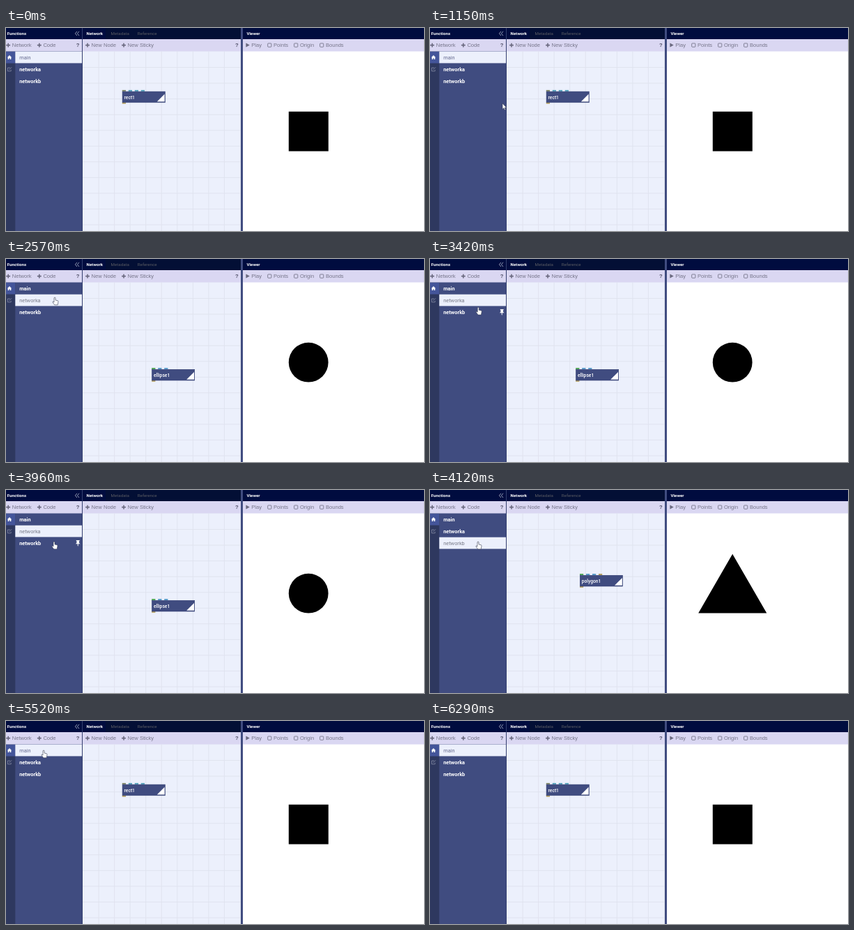
An HTML page for the animation above (7700 ms loop, 600x291 px).

```html
<!DOCTYPE html>
<html lang="en">
<head>
<meta charset="utf-8">
<title>Switching networks</title>
<style>
  html, body { margin: 0; width: 100%; height: 100%; overflow: hidden; background: #fff; }
  svg { display: block; width: 600px; height: 291px; }
  text { font-family: Roboto, "Open Sans", sans-serif; font-weight: 600; fill: #fff; }
  .head { font-size: 6.2px; }
  .tab { font-size: 6.2px; font-weight: 400; fill: #5b5c63; }
  .tool { font: 7.6px "Liberation Sans", Arial, sans-serif; fill: #77768b; }
  .help { font-weight: 700; fill: #55546c; }
  .row { font-size: 7.4px; }
  .node { font-size: 6.7px; font-weight: 500; }
</style>
</head>
<body>
<svg id="stage" viewBox="0 0 600 291" xmlns="http://www.w3.org/2000/svg"></svg>
<script>
const LOOP = 7700;
const ROW_TOP = 33.7, ROW_HEIGHT = 17;
const SLATE = '#404c80', PAPER = '#ecf0fc';
const GREEN = '#4da653', BLUE = '#579bc9', OLIVE = '#b29b58', TEAL = '#55a3bd', MOSS = '#7f8668';
const stage = document.getElementById('stage');

function add(tag, attrs, parent = stage, content = '') {
  const el = document.createElementNS('http://www.w3.org/2000/svg', tag);
  for (const key in attrs) el.setAttribute(key, attrs[key]);
  el.textContent = content;
  parent.appendChild(el);
  return el;
}
const box = (x, y, width, height, fill, parent) => add('rect', { x, y, width, height, fill }, parent);
const path = (d, attrs, parent) => add('path', { d, ...attrs }, parent);
const label = (x, y, cls, content, parent) => add('text', { x, y, class: cls }, parent, content);
const place = (el, x, y) => el.setAttribute('transform', `translate(${x} ${y})`);
const show = (el, on) => el.setAttribute('visibility', on ? 'visible' : 'hidden');

function plusButton(x, content) {
  path(`M${x - 2.9} 24.6h5.8M${x} 21.7v5.8`, { stroke: '#6b6a80', 'stroke-width': 1.6 });
  label(x + 5.6, 27.3, 'tool', content);
}
function checkbox(x, content) {
  add('rect', { x, y: 22, width: 5.2, height: 5.2, rx: 0.8, fill: 'none', stroke: '#77768b', 'stroke-width': 0.9 });
  label(x + 8.3, 27.3, 'tool', content);
}

// Panels
box(0, 0, 600, 291, '#fff');
box(110, 33, 227, 258, PAPER);
for (let i = 1; i < 12; i++) {
  const offset = i * 22.55;
  const line = { stroke: '#dfe3ef', 'stroke-width': 0.9 };
  if (i < 11) path(`M${110.5 + offset} 33.5V291`, line);
  path(`M110 ${34 + offset}H337`, line);
}
box(0, 33, 109.5, 258, SLATE);
box(0, 33, 13.3, 258, '#2e385f');
box(0, 33.7, 13.3, 16.8, '#44559a');
box(0, 0, 600, 16, '#000c3f');
box(143, 0, 194, 16, '#030f35');
box(0, 16, 600, 17.5, '#dad7f2');
box(109, 0, 1, 291, '#35406f');
box(337, 0, 3, 291, SLATE);

// Headers and toolbars
label(1.8, 10, 'head', 'Functions');
label(115.6, 10, 'head', 'Network');
label(150.6, 10, 'tab', 'Metadata');
label(188.8, 10, 'tab', 'Reference');
label(345.4, 10, 'head', 'Viewer');
path('M102 4.8l-2.6 3.1 2.6 3.1M105 4.8l-2.6 3.1 2.6 3.1', { fill: 'none', stroke: '#b9bdd0', 'stroke-width': 0.8 });
plusButton(3.2, 'Network');
plusButton(47.8, 'Code');
plusButton(117, 'New Node');
plusButton(169, 'New Sticky');
label(100.8, 27.4, 'tool help', '?');
label(329, 27.4, 'tool help', '?');
path('M344.4 21.6v6l5.4-3z', { fill: '#6b6a80' });
label(352.3, 27.3, 'tool', 'Play');
checkbox(375.7, 'Points');
checkbox(413.6, 'Origin');
checkbox(450.6, 'Bounds');

// Icons in the side strip
path('M1.8 42.2L5 39l3.2 3.2h-.9v2.8H5.7v-1.8H4.3V45H2.7v-2.8z', { fill: '#fff' });
path('M6 57H2.4v4.8h4.8v-2M4.4 60l3.8-3.8', { fill: 'none', stroke: '#7d849f', 'stroke-width': 0.9 });

// Function list
const highlight = box(13.3, ROW_TOP, 95.7, 16.7, PAPER);
const rows = ['main', 'networka', 'networkb'].map((name, i) =>
  label(19.2, 44.7 + i * ROW_HEIGHT, 'row', name));
const pin = path('M-2.4-4h4.8v1.2h-.7v2.2l1.5 1.8H.5V3.8L0 4.8l-.5-1V1.2h-2.7l1.5-1.8v-2.2h-.7z', { fill: '#fff' });

// One graph and its rendered shape per function
function network(x, y, name, ports, draw) {
  const group = add('g', {});
  ports.forEach((color, i) => box(x + i * 9, y - 1.9, 5.2, 2, color, group));
  box(x, y + 16, 5.2, 1.8, OLIVE, group);
  add('rect', { x: x + 0.3, y: y + 0.3, width: 61.2, height: 15.7, fill: SLATE, stroke: '#333f72', 'stroke-width': 0.6 }, group);
  path(`M${x + 50} ${y + 14.8}h10.8v-10.8z`, { fill: '#fff' }, group);
  label(x + 2.7, y + 10.7, 'node', name, group);
  draw(group);
  return group;
}
const networks = [
  network(166.8, 90.8, 'rect1', [MOSS, TEAL, TEAL, TEAL], g => box(405.8, 119.8, 57, 56.8, '#000', g)),
  network(209.2, 158, 'ellipse1', [GREEN, BLUE, BLUE], g => add('circle', { cx: 434.2, cy: 148.2, r: 28.4 }, g)),
  network(215, 122, 'polygon1', [GREEN, BLUE, BLUE, OLIVE], g => path('M434.2 91.8L483.3 176.4H385.2z', {}, g)),
];

// Pointer; the hot spot is at 0,0
const outline = { fill: '#fff', stroke: '#333950', 'stroke-width': 0.6, 'stroke-linejoin': 'round' };
const ring = add('circle', { r: 7, fill: '#ff0', 'fill-opacity': 0.45 });
const arrow = path('M0 0V8.4L1.9 6.7 3.2 9.6 4.5 9 3.3 6.2H5.8z', outline);
const hand = path('M-1 .6Q0-.6 1 .6V4L4.2 4.7Q5.2 5 5 6.2L4.2 10.8H-.3L-3 7Q-3.3 5.8-2.1 6L-1 7z', outline);

const START = [370.5, 297];
const linear = p => p;
const easeOut = p => 1 - (1 - p) ** 2;
const easeIn = p => p * p;

// Pointer moves: first step, last step, number of steps, end point, easing
const moves = [
  [530, 690, 3, [252, 228], linear],
  [920, 1150, 4, [104, 108], linear],
  [1240, 1620, 6, [67.7, 40], easeOut],
  [1700, 1700, 1, [67.7, 41], linear],
  [1860, 2180, 5, [70, 55], easeOut],
  [3270, 3650, 6, [69, 74], easeOut],
  [4740, 4970, 4, [59, 48], linear],
  [5050, 5280, 4, [54, 42], easeOut],
  [6140, 6220, 2, [49, 179], easeIn],
  [6290, 6290, 1, [47, 310], linear],
];
const clicks = [[2420, 2570], [3800, 3960], [5430, 5510]];
const switches = [[2570, 1], [4040, 2], [5510, 0]];

function pointerAt(t) {
  let from = START;
  for (const [first, last, steps, to, ease] of moves) {
    if (t < first) break;
    if (t < last) {
      const step = 1 + Math.floor((t - first) / (last - first) * (steps - 1) + 0.02);
      const p = ease(step / steps);
      return from.map((v, i) => v + (to[i] - v) * p);
    }
    from = to;
  }
  return from;
}

function render(t) {
  const selected = switches.reduce((now, [at, index]) => t >= at ? index : now, 0);
  const [x, y] = pointerAt(t);
  const hovered = x > 13 && x < 109 ? Math.floor((y - ROW_TOP) / ROW_HEIGHT) : -1;
  const overRow = hovered >= 0 && hovered < rows.length;

  highlight.setAttribute('y', ROW_TOP + selected * ROW_HEIGHT);
  rows.forEach((row, i) => {
    const active = i === selected;
    row.style.fill = active ? (i ? '#777a88' : '#666b91') : '#fff';
    row.style.fontWeight = active ? 400 : 600;
    show(networks[i], active);
  });
  show(pin, overRow && hovered !== selected);
  place(pin, 103.2, 42 + hovered * ROW_HEIGHT);

  show(ring, clicks.some(([down, up]) => t >= down && t < up));
  show(hand, overRow);
  show(arrow, !overRow);
  for (const el of [ring, hand, arrow]) place(el, x, y);
}

const began = performance.now();
function tick() {
  render((performance.now() - began) % LOOP);
  requestAnimationFrame(tick);
}
tick();
</script>
</body>
</html>
```
